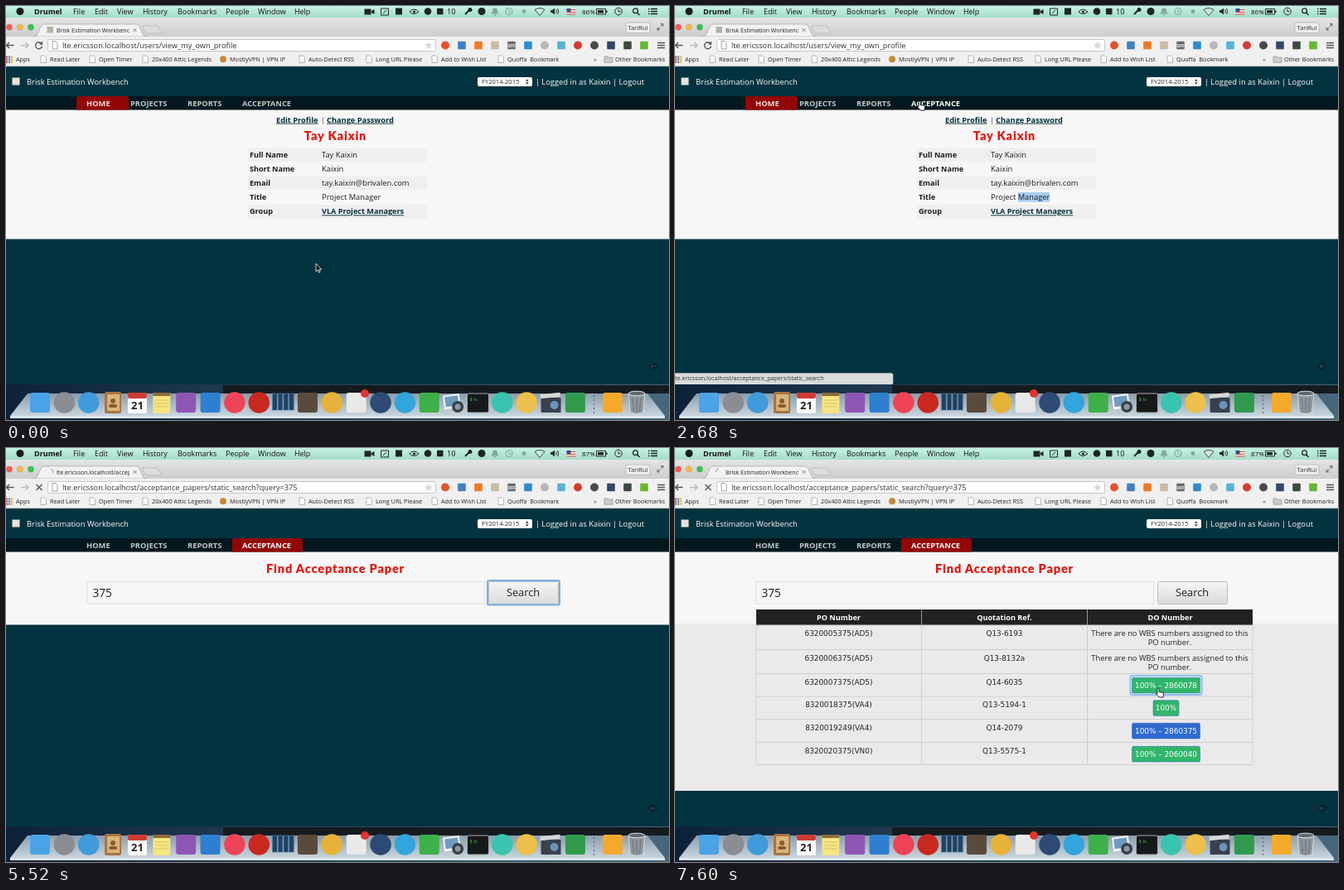
Write an HTML page that moves like this. It is 800x500 px and loops after 8000 ms.

```html
<!DOCTYPE html>
<html lang="en">
<head>
<meta charset="utf-8">
<title>Acceptance paper search</title>
<style>
  html, body { margin: 0; width: 100%; height: 100%; overflow: hidden; background: #02333f; }
  svg { display: block; width: 800px; height: 500px; }
  text { font-family: "Open Sans", "Noto Sans", sans-serif; white-space: pre; }
  .num { font-family: "DejaVu Sans", sans-serif; }
  .head { font-family: Lato, "Open Sans", sans-serif; font-weight: 900; letter-spacing: .85px; }
</style>
</head>
<body>
<svg id="stage" viewBox="0 0 800 500" xmlns="http://www.w3.org/2000/svg">
  <defs>
    <linearGradient id="menu" x2="0" y2="1"><stop stop-color="#c6f1e2"/><stop offset="1" stop-color="#a4dcc9"/></linearGradient>
    <linearGradient id="strip" x2="0" y2="1"><stop stop-color="#e4e4e4"/><stop offset="1" stop-color="#cdcdcd"/></linearGradient>
    <linearGradient id="desk"><stop stop-color="#0c2238"/><stop offset="1" stop-color="#47677d"/></linearGradient>
    <linearGradient id="shelf" x2="0" y2="1"><stop stop-color="#8b9dab"/><stop offset="1" stop-color="#c8d5dd"/></linearGradient>
    <linearGradient id="button" x2="0" y2="1"><stop stop-color="#f6f6f6"/><stop offset="1" stop-color="#dadada"/></linearGradient>
    <linearGradient id="pressed" x2="0" y2="1"><stop stop-color="#d4d4d4"/><stop offset="1" stop-color="#e6e6e6"/></linearGradient>
    <clipPath id="tabClip"><rect x="60" y="20" width="89" height="16"/></clipPath>
  </defs>
</svg>
<script>
const stage = document.getElementById('stage');
const APP = 'Brisk Estimation Workbench';
const HOST = 'lte.ericsson.localhost/';
const SEARCH_URL = HOST + 'acceptance_papers/static_search';
const HINT = 'Type partial or full, PO or DO number e.g. 345(AD5) / 285';
const BOLD = { 'font-weight': 700 };
const MID = { 'text-anchor': 'middle' };
const LINK = { ...BOLD, 'text-decoration': 'underline' };
const DARK = '#02333f', LINK_INK = '#04303c', LOOP = 8000, STEP = 40;

function add(parent, tag, attrs = {}) {
  const node = document.createElementNS(stage.namespaceURI, tag);
  for (const key in attrs) node.setAttribute(key, attrs[key]);
  return parent.appendChild(node);
}
const group = (parent, attrs) => add(parent, 'g', attrs);
const box = (p, x, y, width, height, fill, more) => add(p, 'rect', { x, y, width, height, fill, ...more });
const dot = (p, cx, cy, r, fill, more) => add(p, 'circle', { cx, cy, r, fill, ...more });
const line = (p, d, stroke, width = 1, more) =>
  add(p, 'path', { d, stroke, 'stroke-width': width, fill: 'none', ...more });
const shape = (p, d, fill, more) => add(p, 'path', { d, fill, ...more });
function text(p, x, y, words, size, fill = '#1c1c1c', more) {
  const node = add(p, 'text', { x, y, 'font-size': size, fill, ...more });
  node.textContent = words;
  return node;
}
const show = (node, on) => node.setAttribute('display', on ? 'inline' : 'none');

// ---- Web pages
const web = group(stage);
box(web, 0, 73, 800, 385, DARK);
box(web, 0, 109, 800, 17, '#02181e');
const content = box(web, 0, 125.5, 800, 156, '#f7f7f7');
const lower = box(web, 0, 212, 800, 202, '#eaeaea');
box(web, 7.5, 86.5, 9, 9, '#e6e4da');
text(web, 25, 95, APP, 9.4, '#fff');
box(web, 569, 86, 66, 11, '#fff', { rx: 2 });
text(web, 574, 94.3, 'FY2014-2015', 7.6, '#222');
shape(web, 'M627 90.8l1.8-2.6 1.8 2.6zM627 92.2l1.8 2.6 1.8-2.6z', '#333');
text(web, 770, 95, '| Logged in as Kaixin | Logout', 9.4, '#fff', { 'text-anchor': 'end' });
const activeTab = shape(web, '', '#930606');
const nav = [['HOME', 97], ['PROJECTS', 150], ['REPORTS', 219], ['ACCEPTANCE', 285]]
  .map(([name, x]) => text(web, x, 121.3, name, 9.35, '#c3c8ca', BOLD));
shape(web, 'M775 435l6-5 6 5-6 5z', '#06222a');
line(web, 'M784 435h-6m2-2l-2 2 2 2', '#3b616b', .8);

const profile = group(web);
text(profile, 326, 140.6, 'Edit Profile', 9.25, LINK_INK, LINK);
text(profile, 380, 140.6, '|', 9.25, '#555');
text(profile, 387, 140.6, 'Change Password', 9.25, LINK_INK, LINK);
text(profile, 397.5, 162, 'Tay Kaixin', 14.5, '#e5170f', { ...MID, class: 'head' });
for (const y of [171.7, 205.7, 239.7]) box(profile, 292, y, 216, 16.5, '#efefef');
const selection = box(profile, 381, 225, 31, 11.5, '#a6cdf3');
[['Full Name', 'Tay Kaixin'], ['Short Name', 'Kaixin'], ['Email', 'tay.kaixin@brivalen.com'],
 ['Title', 'Project Manager']].forEach(([label, value], i) => {
  text(profile, 294, 183.4 + 17 * i, label, 9.1, '#1c1c1c', BOLD);
  text(profile, 381, 183.4 + 17 * i, value, 9.35);
});
text(profile, 294, 251.4, 'Group', 9.1, '#1c1c1c', BOLD);
text(profile, 381, 251.4, 'VLA Project Managers', 9.15, LINK_INK, LINK);

const form = group(web);
text(form, 397.5, 151, 'Find Acceptance Paper', 14.5, '#e5170f', { ...MID, class: 'head' });
const glow = box(form, 97, 160.5, 481.5, 28.5, 'none', { stroke: '#a9cdf3', 'stroke-width': 2, rx: 2 });
const field = box(form, 98, 161.5, 479.5, 26.5, '#fff', { stroke: '#d4d4d4' });
const caret = line(form, 'M104.5 167v15', '#222');
const query = text(form, 104.5, 180, HINT, 13.67);
const button = box(form, 582.5, 161.5, 84, 27, 'url(#button)', { stroke: '#bdbdbd', rx: 2 });
const buttonRing = box(form, 581, 160, 87, 29.5, 'none', { stroke: '#7badea', 'stroke-width': 2, rx: 2 });
text(form, 624, 179.4, 'Search', 12.8, '#222', MID);

const results = group(web);
box(results, 98, 195, 599, 19, '#222');
['PO Number', 'Quotation Ref.', 'DO Number'].forEach((name, i) =>
  text(results, 197.5 + 200 * i, 208, name, 9.15, '#fff', { ...BOLD, ...MID }));
const rowTops = [214, 243.5, 272.5, 300, 327.5, 355.5, 382.5];
for (const y of rowTops) line(results, `M98 ${y}H697`, '#cfcfcf');
for (const x of [98, 297.5, 497.5, 697]) line(results, `M${x} 214V382.5`, '#cfcfcf');
line(results, 'M297.5 195v19M497.5 195v19', '#999');
const GREEN = '#31b56b';
const badgeRing = box(results, 549.5, 275, 86, 23, '#fff', { stroke: '#8fbcf0', 'stroke-width': 2, rx: 3 });
[['6320005375(AD5)', 'Q13-6193'],
 ['6320006375(AD5)', 'Q13-8132a'],
 ['6320007375(AD5)', 'Q14-6035', '100% – 2860078', GREEN],
 ['8320018375(VA4)', 'Q13-5194-1', '100%', GREEN],
 ['8320019249(VA4)', 'Q14-2079', '100% – 2860375', '#2f69d0'],
 ['8320020375(VN0)', 'Q13-5575-1', '100% – 2060040', GREEN]].forEach(([po, ref, order, color], i) => {
  const y = rowTops[i], num = { ...MID, class: 'num' };
  text(results, 197.5, y + 13, po, 8.9, '#222', num);
  text(results, 397.5, y + 13, ref, 8.9, '#222', num);
  if (order) {
    const w = order.length > 4 ? 82 : 31;
    box(results, 592.5 - w / 2, y + 4.8, w, 18.8, color,
      { rx: 1.5, stroke: '#2c64c4', 'stroke-dasharray': '1.5 1.2', 'stroke-width': .9 });
    text(results, 592.5, y + 17.4, order, 8.9, '#fff', num);
  } else {
    text(results, 597, y + 13, 'There are no WBS numbers assigned to this', 9.33, '#222', MID);
    text(results, 597, y + 24, 'PO number.', 9.33, '#222', MID);
  }
});

const status = group(web);
box(status, -2, 443.5, 265, 14, '#d9dcdc', { stroke: '#a9b0b2', 'stroke-width': .7, rx: 2 });
text(status, -1.8, 451.8, SEARCH_URL, 7.15, '#333');

// ---- System menu
box(stage, 0, 0, 800, 14, 'url(#menu)');
dot(stage, 17, 6.5, 4.5, '#1b1b1b');
text(stage, 34, 9.9, 'Drumel', 9, '#111', BOLD);
[['File', 81], ['Edit', 107], ['View', 134], ['History', 165], ['Bookmarks', 207],
 ['People', 265], ['Window', 304], ['Help', 348]].forEach(([name, x]) => text(stage, x, 9.9, name, 8.95, '#111'));
const INK = '#1d2624', PALE = '#84a89c';
shape(stage, 'M432.5 3.5h8v7h-8zM441 6l3.5-2v6l-3.5-2z', INK);
line(stage, 'M452.5 3h9v8h-9zM455 9l4-4', INK);
box(stage, 470, 2.5, 8, 8, INK);
line(stage, 'M487 7q5-6 11 0-6 5-11 0z', INK);
dot(stage, 492.5, 7, 1.6, INK);
dot(stage, 509, 6.5, 4.3, INK);
box(stage, 520, 2.8, 7.5, 7.5, INK);
text(stage, 532, 9.9, '10', 9.2, '#111');
line(stage, 'M554 10l5-5', INK, 2);
dot(stage, 560, 4.5, 2.5, INK);
dot(stage, 574, 6.5, 4.5, INK);
shape(stage, 'M585 9.5q2-1.5 2-4 0-3 3-3t3 3q0 2.5 2 4zM589 10h2v1.5h-2z', PALE);
dot(stage, 607, 6.5, 4, 'none', { stroke: PALE, 'stroke-width': 1.2 });
line(stage, 'M607 4v3l2 1', PALE);
dot(stage, 625, 6.5, 2.5, PALE);
shape(stage, 'M638 4.5q6-4 12 0l-6 7z', '#cbe9df', { stroke: INK, 'stroke-width': .8 });
shape(stage, 'M657 5h2l3-2.5v8l-3-2.5h-2z', INK);
line(stage, 'M663.5 4.5q1.5 2 0 4m2-5.5q2.5 3.5 0 7', INK);
box(stage, 676.5, 3, 11, 7.5, '#f3e6e4');
line(stage, 'M676.5 4.5h11m-11 3h11m-11 2.5h11', '#c84a46', 1.2);
box(stage, 676.5, 3, 5, 4, '#3a4f86');
const charge = text(stage, 695, 9.9, '86%', 8, '#111');
box(stage, 712.5, 3.5, 11, 6.5, 'none', { stroke: INK, 'stroke-width': .9 });
box(stage, 714, 5, 7, 3.5, INK);
box(stage, 724, 5.5, 1.5, 2.5, INK);
dot(stage, 739, 6.5, 4.3, 'none', { stroke: INK });
line(stage, 'M739 3.8v3h2.5', INK);
dot(stage, 759.5, 5.8, 2.9, 'none', { stroke: INK, 'stroke-width': 1.3 });
line(stage, 'M761.5 8l3 3', INK, 1.5);
line(stage, 'M775 3.5h1.5m1.5 0h8m-11 3h1.5m1.5 0h8m-11 3h1.5m1.5 0h8', INK, 1.3);

// ---- Browser frame
box(stage, 0, 14, 800, 23, 'url(#strip)');
['#fb5b55', '#fcbb3f', '#36c64b'].forEach((c, i) =>
  dot(stage, 4 + 13 * i, 25.6, 3.6, c, { stroke: '#00000033', 'stroke-width': .6 }));
shape(stage, 'M33 37q4 0 5-3l4-9q1-3 4-3H157q3 0 4 3l4 9q1 3 5 3z', '#f2f2f2', { stroke: '#a5a5a5', 'stroke-width': .7 });
shape(stage, 'M165 24h16q2 0 3 2l3 5q1 2-1 2h-15q-2 0-3-2l-3-5q-1-2 0-2z', '#dcdcdc', { stroke: '#a9a9a9', 'stroke-width': .6 });
const favicon = box(stage, 49.5, 25, 7.5, 7.5, '#b5b1a4');
const spinner = line(stage, 'M49.2 29a3.8 3.8 0 0 1 3.8-3.8', '#999', 1.1);
const title = text(stage, 61, 31.5, APP, 7.05, '#222', { 'clip-path': 'url(#tabClip)' });
line(stage, 'M153.5 27l4 4m0-4l-4 4', '#777', .9);
box(stage, 748, 20, 29, 12.5, '#ececec', { stroke: '#adadad', 'stroke-width': .7, rx: 2 });
text(stage, 762.5, 29, 'TanRui', 7.6, '#333', MID);
line(stage, 'M790 24.5l3-3m-3 0h3v3M789 26l-3 3m3 0h-3v-3', '#777', 1.1);

box(stage, 0, 37, 800, 36, '#f0f0f0');
line(stage, 'M0 72.7H800', '#b4b4b4', .8);
line(stage, 'M9.5 47.5h-9m3.5-3.5l-3.5 3.5 3.5 3.5', '#555', 1.5);
line(stage, 'M18 47.5h9m-3.5-3.5l3.5 3.5-3.5 3.5', '#bbb', 1.5);
const reload = line(stage, 'M42.5 45a4 4 0 1 0 1 3.5M43.5 43v3h-3', '#555', 1.3);
const stop = line(stage, 'M36.5 44l7 7m0-7l-7 7', '#555', 1.4);
box(stage, 50.5, 40.5, 468, 14, '#fff', { stroke: '#b9b9b9', 'stroke-width': .8, rx: 2 });
shape(stage, 'M56 42.5h4l2 2v7.5h-6z', '#fff', { stroke: '#888', 'stroke-width': .8 });
const address = text(stage, 68, 50.6, '', 9.21, '#333');
shape(stage, 'M510 42.5l1.5 3.2 3.5.4-2.6 2.3.8 3.5-3.2-1.8-3.2 1.8.8-3.5-2.6-2.3 3.5-.4z', '#dadada');
['c#e4522b', 's#3f7fc4', 's#ef7a22', 's#cbb9a5', 's#6a6a6a', 's#2c8cd0', 'c#b7b7b7',
 's#55b4d4', 'c#d83a32', 'c#4a4a4a', 's#33476b', 's#3c4a3e', 's#66b82d'].forEach((icon, i) => {
  const x = 530 + 20 * i, color = icon.slice(1);
  icon[0] === 'c' ? dot(stage, x, 47.5, 5, color) : box(stage, x - 4.8, 42.7, 9.6, 9.6, color, { rx: 1 });
});
text(stage, 610, 50, 'OFF', 5, '#fff', { ...MID, ...BOLD });
line(stage, 'M786 44.5h9m-9 3h9m-9 3h9', '#555', 1.4);

['#d5493f', '#4285d6', '#e8b931'].forEach((c, i) => {
  for (let j = 0; j < 3; j++) box(stage, 3 * i, 60.5 + 3 * j, 2.2, 2.2, c);
});
[['Apps', 12], ['Read Later', 53, 1], ['Open Timer', 112, 1], ['20x400 Attic Legends', 176, 1],
 ['MostlyVPN | VPN IP', 270], ['Auto-Detect RSS', 365, 1], ['Long URL Please', 446, 1],
 ['Add to Wish List', 525, 1], ['Quoffa  Bookmark', 605, 1], ['Other Bookmarks', 735]].forEach(([name, x, page]) => {
  text(stage, x, 67, name, 7.3, '#222');
  if (page) shape(stage, `M${x - 11} 60h4.5l2 2v6.5h-6.5z`, '#fff', { stroke: '#999', 'stroke-width': .7 });
});
dot(stage, 262, 64.3, 4, '#c58a3a');
text(stage, 709, 67, '»', 8, '#555');
shape(stage, 'M722 61h4l1 1.2h5v6h-10z', '#c9cdd2', { stroke: '#8b8f94', 'stroke-width': .7 });

// ---- Dock
box(stage, 0, 457, 800, 43, 'url(#desk)');
box(stage, 262, 458, 538, 10, '#151b1f');
shape(stage, 'M26 468H774L795 495H5z', 'url(#shelf)');
box(stage, 5, 495, 790, 3, '#dde6ec');
['s#4aa3e6', 'c#8a8d92', 'c#3f9bd9', 'book', 'date', 'note', 's#8f55b5', 's#2f7fd0', 'c#ef4458', 'c#c9281f',
 'rack', 's#5a4a3c', 'c#e6b23a', 's#e9e9ea', 'c#2c4a73', 'c#32a5dd', 's#3eb049', 'photo', 'term', 'c#38c4ae',
 'c#ecc04a', 'film', 's#2f9a4e', 's#f3a92c', 'bin'].forEach((icon, i) => {
  const x = i < 23 ? 41 + 29.36 * i : 732 + 29 * (i - 23);
  const g = group(stage, { transform: `translate(${x} 479)` });
  const color = icon.slice(1);
  if (icon[1] === '#') {
    icon[0] === 'c' ? dot(g, 0, 0, 12.8, color) : box(g, -12, -12, 24, 24, color, { rx: 3 });
  } else if (icon === 'book') {
    box(g, -10, -13, 20, 26, '#a8743f', { rx: 2 });
    box(g, -7, -10, 15, 20, '#d9b57c');
    dot(g, 0, -2, 3, '#8a5c30');
    box(g, -5, 2, 10, 4, '#8a5c30', { rx: 2 });
  } else if (icon === 'date') {
    box(g, -11.5, -12, 23, 25, '#fafafa', { rx: 2 });
    box(g, -11.5, -12, 23, 7, '#cf3b34', { rx: 2 });
    text(g, 0, 8, '21', 13, '#222', { ...MID, ...BOLD });
  } else if (icon === 'note') {
    box(g, -10.5, -12, 21, 25, '#f6e482', { rx: 1 });
    box(g, -10.5, -12, 21, 4, '#8d6b3c');
    line(g, 'M-8-3h16m-16 4h16m-16 4h16', '#cdb95c', .8);
  } else if (icon === 'rack') {
    for (let k = 0; k < 4; k++) box(g, -13 + 6.7 * k, -11, 5.5, 20, '#22405f', { stroke: '#4d7ba6', 'stroke-width': .7 });
  } else if (icon === 'photo') {
    box(g, -12, -10, 20, 17, '#f5f5f5', { transform: 'rotate(-8)' });
    box(g, -10, -8, 16, 12, '#6f9cc0', { transform: 'rotate(-8)' });
    dot(g, 5, 5, 7, '#3b3f45');
    dot(g, 5, 5, 3.5, '#8b98a8');
  } else if (icon === 'term') {
    box(g, -13, -11, 26, 23, '#15191a', { stroke: '#a5a9ab', rx: 2 });
    text(g, -10, -2, '$ ls', 6, '#44c45a');
  } else if (icon === 'film') {
    box(g, -12, -6, 24, 18, '#38414d', { rx: 1 });
    box(g, -12, -11, 24, 5, '#d7d7d7', { transform: 'rotate(-6)' });
    dot(g, 4, 3, 5, '#6d93b8');
  } else {
    shape(g, 'M-10-11h20l-2.5 23q-7.5 3-15 0z', '#8d969c', { stroke: '#e3e6e8', 'stroke-width': .8 });
    add(g, 'ellipse', { cx: 0, cy: -11, rx: 10, ry: 2.8, fill: '#5e676d', stroke: '#e3e6e8' });
    line(g, 'M-5-6l1.5 17M0-6v18M5-6l-1.5 17', '#636d74', .8);
  }
});
dot(stage, 433, 468, 5, '#e5322d');
line(stage, 'M709.5 470v25', '#5d6c78', 1.2, { 'stroke-dasharray': '2 3' });

// ---- Pointer
const pointer = group(stage);
const looks = {
  arrow: shape(pointer, 'M0 0V9.7l2.2-2 1.5 3.3 1.5-.7-1.5-3.1h3z', '#111', { stroke: '#fff', 'stroke-width': .8 }),
  beam: line(pointer, 'M-2.2-5.2Q0-5.2 0-3.8 0-5.2 2.2-5.2M0-4V4M-2.2 5.2Q0 5.2 0 3.8 0 5.2 2.2 5.2', '#111'),
  hand: shape(pointer, 'M1 0q1.2 0 1.2 1.2V4.5l4 .8q1.5.4 1.3 2L7 11H2.2L-1.6 6.8q.3-1.2 1.6-.4V1.2Q0 0 1 0z',
    '#fff', { stroke: '#111', 'stroke-width': .9 })
};

// ---- Timeline
const path = [
  [0, 374, 311], [600, 374, 311], [680, 383, 272], [760, 396, 250], [840, 403, 231], [1240, 403, 231],
  [1560, 421, 231], [2000, 421, 231], [2120, 355, 230], [2200, 330, 222], [2320, 305, 203], [2400, 291, 168],
  [2480, 285, 150], [2600, 291, 125], [2680, 294, 115], [3200, 294, 115], [3320, 268, 150], [3440, 240, 165],
  [3520, 213, 195], [3680, 226, 177], [5800, 226, 177], [5920, 232, 212], [6040, 241, 247], [6120, 262, 311],
  [6240, 282, 345], [6560, 282, 345], [6760, 407, 290], [7240, 407, 290], [7320, 476, 288], [7440, 582, 290], [8000, 582, 290]
];
const steps = {
  look: [[0, 'arrow'], [800, 'beam'], [2080, 'arrow'], [2600, 'hand'], [3240, 'arrow'], [3400, 'beam'],
    [3500, 'arrow'], [3600, 'beam'], [4440, ''], [5800, 'arrow'], [7440, 'hand']],
  picked: [[0, 0], [1240, 1], [1720, 2]],
  page: [[0, 'profile'], [2960, 'search'], [5680, 'results']],
  typed: [[0, ''], [4440, '3'], [4560, '37'], [4720, '375']],
  focus: [[0, 'field'], [4880, 'button'], [5680, ''], [7520, 'badge']],
  pressed: [[0, false], [5120, true], [5320, false]],
  caret: [[0, true], [3840, false], [4160, true]],
  loading: [[0, false], [2720, true], [3040, false], [5320, true], [5760, false], [7520, true]],
  untitled: [[0, false], [2920, true], [3040, false], [5440, true], [5760, false]],
  url: [[0, HOST + 'users/view_my_own_profile'], [2920, SEARCH_URL], [5400, SEARCH_URL + '?query=375']],
  status: [[0, false], [2600, true], [2960, false]]
};
const pick = (list, t) => list.reduce((value, [from, next]) => t >= from ? next : value, '');

function place(t) {
  const i = Math.max(1, path.findIndex(p => p[0] > t));
  const [t0, x0, y0] = path[i - 1], [t1, x1, y1] = path[i];
  const k = (t - t0) / (t1 - t0);
  return [x0 + (x1 - x0) * k, y0 + (y1 - y0) * k];
}

function draw(t) {
  const now = {};
  for (const key in steps) now[key] = pick(steps[key], t);
  const home = now.page === 'profile', found = now.page === 'results';

  show(profile, home);
  show(form, !home);
  show(results, found);
  show(lower, found);
  content.setAttribute('height', home ? 156 : 88);
  activeTab.setAttribute('d', home
    ? 'M85 125.5v-13.5q0-3 3-3h57q3 0 3 3v13.5z'
    : 'M273 125.5v-13.5q0-3 3-3h79q3 0 3 3v13.5z');
  nav[0].setAttribute('fill', home ? '#f1dede' : '#c3c8ca');
  nav[3].setAttribute('fill', !home || now.status ? '#fff' : '#c3c8ca');
  show(status, now.status);

  show(selection, now.picked);
  selection.setAttribute('x', now.picked === 2 ? 414 : 381);
  selection.setAttribute('width', now.picked === 2 ? 38 : 30.5);

  const typing = now.focus === 'field';
  show(glow, typing);
  field.setAttribute('stroke', typing ? '#6b9fdc' : '#dedede');
  field.setAttribute('fill', typing ? '#fff' : '#f6f6f6');
  query.textContent = now.typed || HINT;
  query.setAttribute('fill', now.typed ? '#1c1c1c' : '#929292');
  show(caret, typing && now.caret);
  caret.setAttribute('transform', `translate(${now.typed.length * 7.82} 0)`);
  show(buttonRing, now.focus === 'button');
  button.setAttribute('fill', now.pressed ? 'url(#pressed)' : 'url(#button)');
  show(badgeRing, now.focus === 'badge');

  show(favicon, !now.loading);
  show(spinner, now.loading);
  spinner.setAttribute('transform', `rotate(${(Math.min(t, 7600) - 7600) * -.4} 53 29)`);
  show(reload, !now.loading);
  show(stop, now.loading);
  title.textContent = now.untitled ? SEARCH_URL : APP;
  address.textContent = now.url;
  charge.textContent = t < 4440 ? '86%' : '87%';

  for (const key in looks) show(looks[key], key === now.look);
  pointer.setAttribute('transform', `translate(${place(t)})`);
}

const start = performance.now();
function tick() {
  const t = (performance.now() - start) % LOOP;
  draw(Math.floor(t / STEP) * STEP);
  requestAnimationFrame(tick);
}
tick();
</script>
</body>
</html>
```
